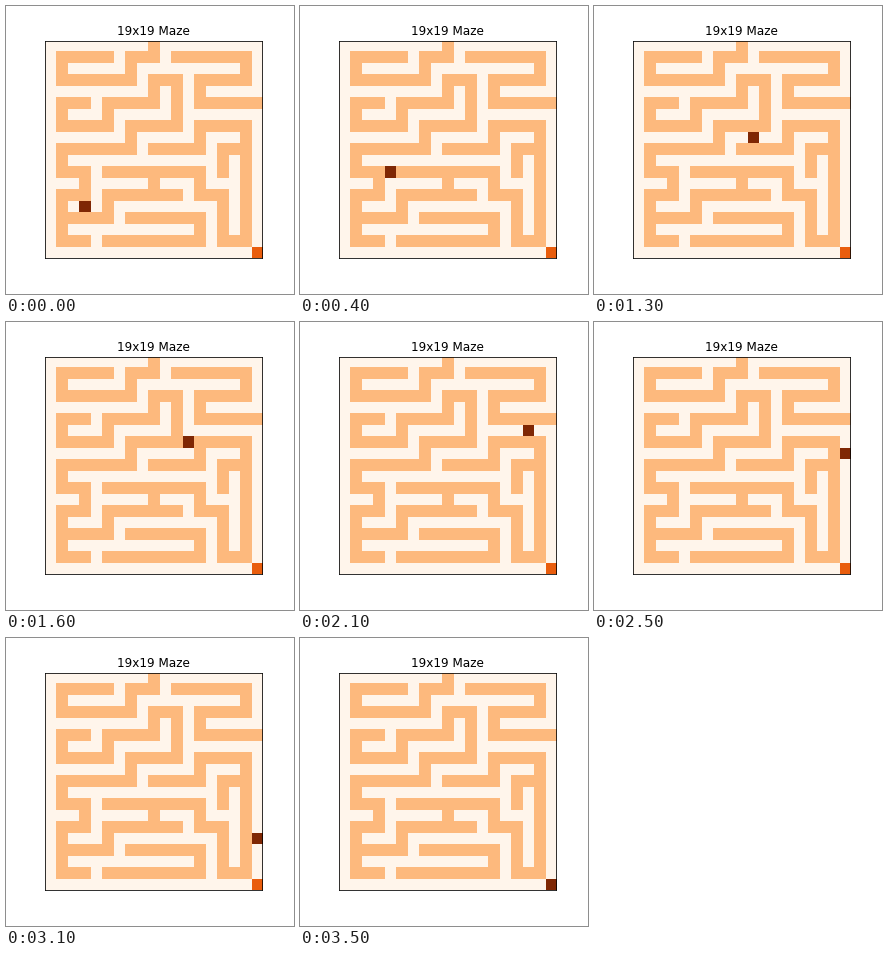
A matplotlib script that plays this animation: 288x288 px, repeating every 3.6 s.

```python
import numpy as np
import matplotlib.pyplot as plt
from matplotlib.animation import FuncAnimation

SIZE = 19
WALL, GOAL, PLAYER = 1, 2, 3

MAZE = """
.........#.........
.#####.###.#######.
.#.....#.........#.
.#######.###.#####.
.........#.#.#.....
.###.#####.#.######
.#...#.....#.......
.#####.#####.#####.
.......#.....#...#.
.#######.#####.###.
.#.............#.#.
.###.#########.#.#.
...#.....#...#...#.
.###.#######.###.#.
.#...#.........#.#.
.#####.#######.#.#.
.#...........#.#.#.
.###.#########.###.
...................
""".split()

# Route as straight runs: direction and number of cells
START = (14, 3)
STEP = {"R": (0, 1), "L": (0, -1), "U": (-1, 0), "D": (1, 0)}
RUNS = [("R", 1), ("U", 4), ("R", 4), ("U", 2), ("R", 4),
        ("U", 2), ("R", 6), ("D", 12)]


def walk(start, runs):
    path = [start]
    for way, count in runs:
        dr, dc = STEP[way]
        for _ in range(count):
            r, c = path[-1]
            path.append((r + dr, c + dc))
    return path


path = walk(START, RUNS)
grid = np.array([[WALL * (ch == "#") for ch in row] for row in MAZE])
grid[-1, -1] = GOAL

fig = plt.figure(figsize=(4, 4), dpi=72)
fig.subplots_adjust(left=0.125, right=0.9, bottom=0.125, top=0.88)
ax = fig.add_subplot()
ax.set_title(f"{SIZE}x{SIZE} Maze")
ax.set_xticks([])
ax.set_yticks([])
image = ax.imshow(grid, cmap="Oranges", vmin=0, vmax=PLAYER,
                  interpolation="nearest")


def update(i):
    view = grid.copy()
    view[path[i]] = PLAYER
    image.set_data(view)
    return [image]


anim = FuncAnimation(fig, update, frames=len(path), interval=100,
                     repeat=True, repeat_delay=0)
plt.show()
```
